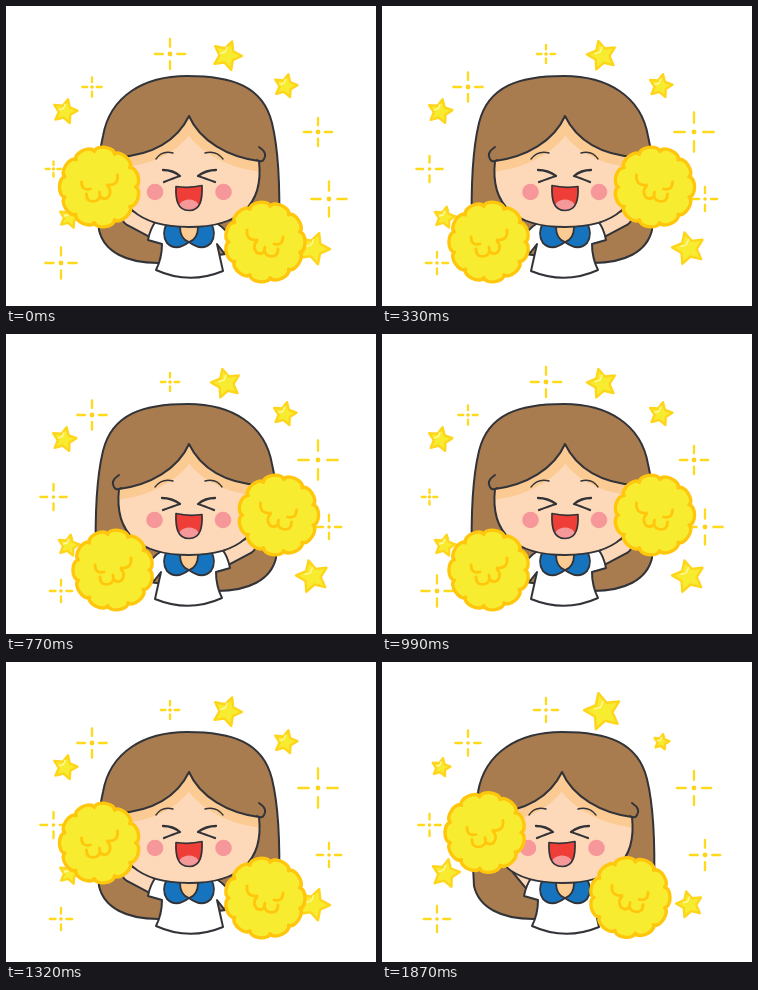
Recreate the animation shown at these times as an HTML page with a canvas. Size 370x300 px, loop 1.98 s.

```html
<!DOCTYPE html>
<html lang="en">
<head>
<meta charset="utf-8">
<title>Cheering girl</title>
<style>
html, body { margin: 0; width: 100%; height: 100%; overflow: hidden; background: #fff; }
canvas { display: block; }
</style>
</head>
<body>
<canvas id="stage" width="370" height="300"></canvas>
<script>
const ctx = document.getElementById('stage').getContext('2d');
const STEP = 110, COUNT = 18;
const INK = '#323338', HAIR = '#a97c50', SKIN = '#fdd9b9', SHADE = '#fbcb93',
      YELLOW = '#f7ec30', GOLD = '#ffc60c', BLUE = '#1673bd', PINK = '#f6979a';

// Pompom centres, shift of face and hair, hand end of the raised arm
const UP = { left: [93.5, 181], right: [259, 236], face: 0, hair: 0, hand: [124, 212] };
const HIGH = { left: [103, 170.5], right: [248, 235.5], face: -3, hair: -1, hand: [137, 206] };
const FRONT = { left: [115, 238.5], right: [252, 238.5], face: 0, hair: 0, front: true };

// x, y, then radius when the arm is up, high, or both are in front; two tilts
const STARS = [
  [221, 49.5, 16.5, 20.5, 12.5, 20, -14],
  [279.5, 80, 13.5, 9.5, 17.5, 14, 12],
  [59, 105.5, 14, 11, 18.5, 14, 12],
  [307.5, 242.5, 18, 15, 22, 20, -14],
  [63.5, 211.5, 12.5, 16, 8, 14, 12]
];

// x, y, then radius in three sizes of the twinkle
const SPARKLES = [
  [164, 48, 10, 13, 16], [323, 193, 13, 16, 18.5], [55, 257, 12, 14, 16.5],
  [86, 81, 15.5, 13.5, 10.5], [312, 126, 20.5, 18, 15], [47.5, 163, 14, 12, 8.5]
];
const TWINKLE = [1, 0, 1, 2, 1, 0, 1, 2, 2];

function shape(path, fill, stroke, width = 2) {
  const p = typeof path === 'string' ? new Path2D(path) : path;
  if (fill) { ctx.fillStyle = fill; ctx.fill(p); }
  if (stroke) { ctx.strokeStyle = stroke; ctx.lineWidth = width; ctx.stroke(p); }
}

function at(x, y, draw, sx = 1, sy = 1) {
  ctx.save();
  ctx.translate(x, y);
  ctx.scale(sx, sy);
  draw();
  ctx.restore();
}

function disc(x, y, r, fill) {
  const p = new Path2D();
  p.arc(x, y, r, 0, 7);
  shape(p, fill);
}

function sparkle(x, y, r) {
  const a = r * .45, b = r - .8;
  shape(`M${x - b} ${y}H${x - a}M${x + a} ${y}H${x + b}M${x} ${y - b}V${y - a}M${x} ${y + a}V${y + b}`,
    null, '#ffd91c', 2.3);
  disc(x, y, r > 14 ? 2.4 : 1.8, '#ffd21a');
}

function star(x, y, r, tilt) {
  const p = new Path2D();
  for (let i = 0; i < 10; i++) {
    const a = (i * 36 - 90 + tilt) * Math.PI / 180, d = (r - 1.5) * (i % 2 ? .5 : 1);
    p.lineTo(x + d * Math.cos(a), y + d * Math.sin(a));
  }
  p.closePath();
  shape(p, YELLOW, '#ffd51c', 2.4);
  shape(`M${x - r * .42} ${y - r * .12}L${x - r * .12} ${y - r * .2}L${x} ${y - r * .5}`, null, '#fff9a8', 1.3);
}

function pompom([x, y], flip) {
  at(x, y, () => {
    const p = new Path2D(), n = 11, turn = 2 * Math.PI / n;
    p.moveTo(36, 0);
    for (let i = 0; i < n; i++) {
      const point = (d, k) => [d * Math.cos((i + k) * turn), d * Math.sin((i + k) * turn)];
      p.bezierCurveTo(...point(43, .1), ...point(43, .9), ...point(36, 1));
    }
    p.closePath();
    shape(p, YELLOW, GOLD, 3.4);
    shape('M-18 -5Q-18 4 -9 2M-13 7Q-13 16 -4 14Q2 12 0 5M1 10Q7 14 10 8Q12 3 8 -1M8 -2Q19 -1 18 -12',
      null, GOLD, 2.8);
  }, flip);
}

function body(pose) {
  if (pose.front) {
    shape('M151 222Q145 246 154 269Q183 277 212 269Q221 246 215 222Z', '#fff', INK);
  } else {
    const arm = `M156 229L${pose.hand}`;
    shape(arm, null, INK, 17);
    shape(arm, null, SKIN, 13);
    shape('M209 216Q222 224 229 238L218 247L211 238L217 265Q183 279 150 264Q156 252 156 238L142 234Q144 223 150 215Z',
      '#fff', INK);
  }
  shape('M168 215H198L193 232Q183 238 173 232Z', SHADE);
  for (const side of [1, -1]) {
    at(183, 0, () => shape('M-22 217Q-28 228 -22 237Q-13 246 0 236Q-9 233 -9 221Z', BLUE, INK, 1.8), side);
  }
}

function face(pose, part) {
  const front = pose.front;
  const fringe = front
    ? `M112 151C148 149 174 134 ${part} 110C199 135 226 149 257 153`
    : `M113 151C146 149 171 135 ${part} 110C194 135 222 151 253 155`;
  const skin = new Path2D(fringe + 'C258 200 232 221 183 221C134 221 105 200 112 151Z');
  shape(skin, SKIN);
  ctx.save();
  ctx.clip(skin);
  shape(fringe, null, SHADE, 21);
  ctx.restore();
  shape(skin, null, INK);
  shape('M253 141Q262 147 258 153Q256 157 251 154', HAIR, INK);
  if (front) shape('M112 140Q102 147 106 152Q109 154 114 151', HAIR, INK);

  shape('M150 153Q156 144 167 147M199 147Q210 144 217 153', null, INK, 1.4);
  shape('M157 164Q167 164 174 170Q168 172 158 176M210 164Q200 164 192 170Q198 172 209 176', null, INK, 2.3);
  disc(149, 186, 8.3, PINK);
  disc(217.5, 186, 8.3, PINK);
  at(183, 180.5, () => {
    const mouth = new Path2D('M-13 0Q0 2 13 -1C13.5 12 12 24 0 24C-12 24 -13.5 12 -13 0Z');
    shape(mouth, '#ef3d38');
    ctx.save();
    ctx.clip(mouth);
    disc(0, 25.5, 12.5, PINK);
    ctx.restore();
    shape(mouth, null, INK, 1.7);
  }, front ? .78 : 1, front ? .88 : 1);
}

function girl(pose, mirrored) {
  at(mirrored ? 366 : 0, 0, () => {
    at(pose.hair + (mirrored ? 3 : 0), 0, () => shape(pose.front
      ? 'M91 222C88 185 90 150 94 125C99 86 137 70 182 70C232 70 264 82 270 120C276 150 275 190 275 222Q245 245 183 245Q120 245 91 222Z'
      : 'M152 257C121 257 98 246 93 224C91 190 91 155 97 130C104 90 138 70 181 70C226 70 257 80 266 117C274 150 274 190 273 226Q270 242 250 244Z',
    HAIR, INK));
    body(pose);
    at(pose.face, 0, () => face(pose, pose.front ? 186 : 183));
    pompom(pose.left, 1);
    pompom(pose.right, -1);
  }, mirrored ? -1 : 1);
}

function draw(now) {
  const frame = Math.floor(now / STEP) % COUNT;
  const beat = (frame + 7) % 9;
  const kind = beat === 0 ? 2 : beat % 2 ? 0 : 1;
  const mirrored = kind < 2 && frame > 2 && frame < 11;

  ctx.fillStyle = '#fff';
  ctx.fillRect(0, 0, 370, 300);
  ctx.lineCap = ctx.lineJoin = 'round';
  for (const [x, y, ...sizes] of SPARKLES) sparkle(x, y, sizes[TWINKLE[beat]]);
  for (const [x, y, up, high, front, tilt, swung] of STARS) {
    const lean = kind === 2 ? 0 : kind === 1 || mirrored ? swung : tilt;
    star(x - (mirrored ? 1 : 0), y, [up, high, front][kind], lean);
  }
  girl([UP, HIGH, FRONT][kind], mirrored);
}

const start = performance.now();
function tick() {
  draw(performance.now() - start);
  requestAnimationFrame(tick);
}
tick();
</script>
</body>
</html>
```
